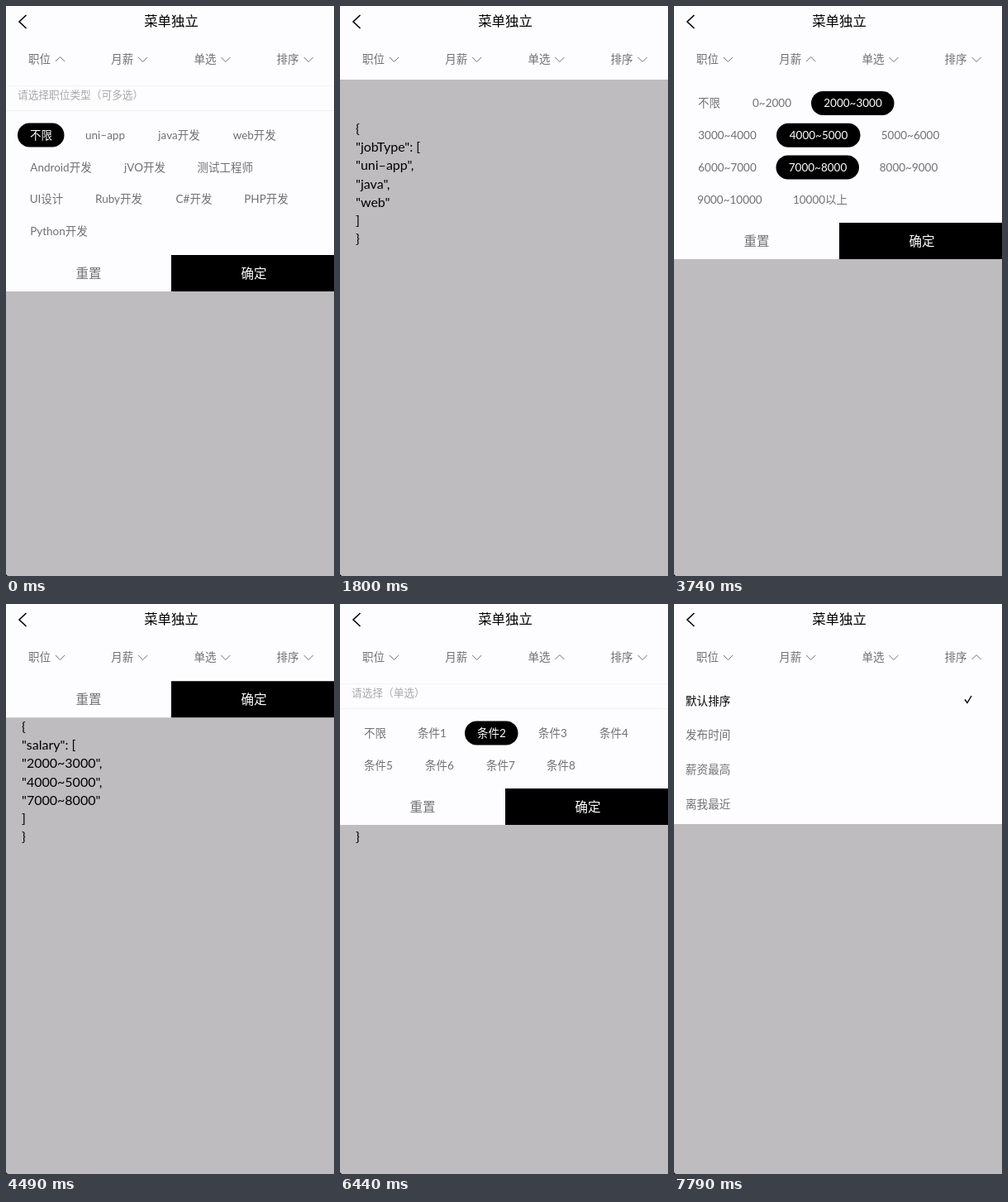
An HTML page that plays this animation: 397x689 px, repeating every 8 s.

```html
<!DOCTYPE html>
<html lang="zh-CN">
<head>
<meta charset="utf-8">
<style>
  html, body { margin: 0; width: 100%; height: 100%; overflow: hidden; background: #fdfcfe; }
  svg { display: block; font-family: Lato, "Noto Sans CJK SC", "Noto Sans CJK", sans-serif; }
  text { white-space: pre; }
</style>
</head>
<body>
<svg id="stage" width="397" height="689" viewBox="0 0 397 689"></svg>
<script>
const LOOP = 8000, STEP = 150, SLIDE = 450;
const PAPER = '#fdfcfe', SHADE = '#bebcbf', GREY = '#707073', HEADER = 89;

const rect = (x, y, w, h, fill, r = 0) =>
  `<rect x="${x}" y="${y}" width="${w}" height="${h}" rx="${r}" fill="${fill}"/>`;
const label = (s, x, y, size, fill = '#000', anchor = 'start') =>
  `<text x="${x}" y="${y + size * .37}" font-size="${size}" fill="${fill}" text-anchor="${anchor}">${s}</text>`;
const line = (d, width, color = '#000') =>
  `<path d="${d}" fill="none" stroke="${color}" stroke-width="${width}"/>`;

// Options are [text, x, text width]; picks are [time, chosen options].
const menus = [
  {
    open: -SLIDE, close: 1350, hide: 1950, bottom: 345, firstRow: 156,
    hint: '请选择职位类型（可多选）',
    rows: [
      [['不限', 29, 27], ['uni–app', 95, 50], ['java开发', 183, 53], ['web开发', 274.5, 52.5]],
      [['Android开发', 29, 75], ['jVO开发', 143, 50], ['测试工程师', 231.5, 67.5]],
      [['UI设计', 29, 40], ['Ruby开发', 107, 59], ['C#开发', 205, 45], ['PHP开发', 288, 54]],
      [['Python开发', 29, 70]]
    ],
    picks: [[0, ['不限']], [150, ['uni–app']], [300, ['uni–app', 'java开发']],
            [600, ['uni–app', 'java开发', 'web开发']]],
    result: ['{', '"jobType": [', '"uni–app",', '"java",', '"web"', ']', '}']
  },
  {
    open: 2390, close: 4190, hide: 4790, bottom: 306, firstRow: 117.5,
    rows: [
      [['不限', 29, 27], ['0~2000', 95, 47], ['2000~3000', 181, 71]],
      [['3000~4000', 29, 71], ['4000~5000', 139, 72], ['5000~6000', 250, 72]],
      [['6000~7000', 29, 71], ['7000~8000', 138.5, 71], ['8000~9000', 248, 72]],
      [['9000~10000', 29, 77], ['10000以上', 144.5, 65]]
    ],
    picks: [[0, ['不限']], [3290, ['2000~3000']], [3440, ['2000~3000', '4000~5000']],
            [3740, ['2000~3000', '4000~5000', '7000~8000']]],
    result: ['{', '"salary": [', '"2000~3000",', '"4000~5000",', '"7000~8000"', ']', '}']
  },
  {
    open: 5090, close: 6890, hide: 7190, bottom: 267, firstRow: 156, snap: true,
    hint: '请选择（单选）',
    rows: [
      [['不限', 29, 27], ['条件1', 95, 33], ['条件2', 166, 35], ['条件3', 240, 35], ['条件4', 314, 35]],
      [['条件5', 29, 35], ['条件6', 103, 35], ['条件7', 177, 35], ['条件8', 250, 35]]
    ],
    picks: [[0, ['不限']], [5840, ['条件3']], [6440, ['条件2']]],
    result: ['{', '"single": "condition_2"', '}']
  },
  {
    open: 7340, close: LOOP, hide: LOOP, bottom: 266,
    list: ['默认排序', '发布时间', '薪资最高', '离我最近']
  }
];

// Share of the panel that is visible, moving in whole ticks.
function shown(menu, t) {
  const ticks = since => Math.floor((t - since) / STEP) * STEP;
  if (t < menu.close) return Math.min(1, ticks(menu.open) / SLIDE);
  return menu.snap ? 0 : Math.max(0, 1 - (ticks(menu.close) + 50) / SLIDE);
}

function option([s, x, w], y, chosen) {
  return (chosen ? rect(x - 15, y - 14.5, w + 29.5, 29, '#000', 14.5) : '') +
    label(s, x + w / 2, y, 13.5, chosen ? '#fff' : GREY, 'middle');
}

function panel(menu, t) {
  const { bottom, hint, list } = menu;
  let out = rect(0, HEADER, 397, bottom - HEADER, PAPER);
  if (list) {
    list.forEach((s, i) => out += label(s, 14, 116.5 + i * 41.7, 13.6, i ? GREY : '#000'));
    return out + line('M352 115.5l3 4 5-8.5', 1.4);
  }
  if (hint) {
    out += rect(0, 96, 397, 1, '#f4f3f6') + rect(0, 126, 397, 1, '#f0eff2') +
      label(hint, 14, 107.5, 12.7, '#a9a8ab');
  }
  const chosen = menu.picks.filter(([at]) => at <= t).pop()[1];
  menu.rows.forEach((row, i) => row.forEach(item =>
    out += option(item, menu.firstRow + i * 38.7, chosen.includes(item[0]))));
  return out + rect(200, bottom - 44, 197, 44, '#000') +
    label('重置', 100, bottom - 22, 15.5, GREY, 'middle') +
    label('确定', 300, bottom - 22, 15.5, '#fff', 'middle');
}

function header(t) {
  let out = rect(0, 0, 397, HEADER, PAPER) + line('M24.5 11L16 19l8.5 8', 1.6) +
    label('菜单独立', 200, 18, 16.4, '#000', 'middle');
  ['职位', '月薪', '单选', '排序'].forEach((s, i) => {
    const x = 27 + i * 100.2, up = t >= menus[i].open && t < menus[i].close;
    out += label(s, x, 64, 13.5, GREY) +
      line(`M${x + 33} ${up ? 67 : 62}l5.5 ${up ? -5.5 : 5.5} 5.5 ${up ? 5.5 : -5.5}`, 1, GREY);
  });
  return out;
}

function scene(t) {
  const menu = menus.find(m => t >= m.open && t < m.hide);
  const answered = menus.filter(m => t >= m.close).pop();
  let out = rect(0, 0, 397, 689, menu ? SHADE : PAPER);
  if (answered) answered.result.forEach((s, i) => out += label(s, 19, 148 + i * 22.2, 16));
  if (menu) {
    const lift = (menu.bottom - HEADER) * (shown(menu, t) - 1);
    out += `<g transform="translate(0 ${lift})">${panel(menu, t)}</g>`;
  }
  return out + header(t) + '<path d="M0 687l2 2H0z"/>';
}

const stage = document.getElementById('stage');
let last;
function draw() {
  const next = scene(performance.now() % LOOP);
  if (next !== last) stage.innerHTML = last = next;
  requestAnimationFrame(draw);
}
draw();
</script>
</body>
</html>
```
